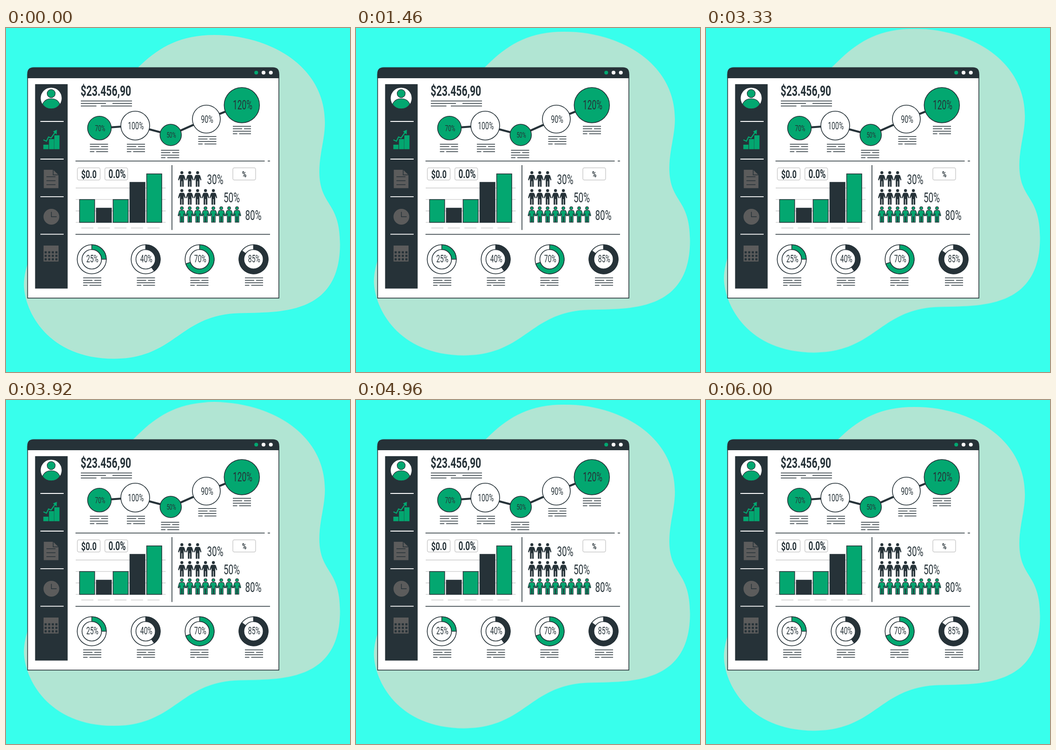
Recreate the animation shown at these times as an HTML page. Size 740 by 740 pixels, loop 6.04 s.

```html
<!DOCTYPE html>
<html lang="en">
<head>
<meta charset="utf-8">
<title>Dashboard</title>
<style>
  html, body { margin: 0; width: 100%; height: 100%; overflow: hidden; background: #38ffec; }
  svg { display: block; width: 740px; height: 740px; }
  text { font-family: Roboto, "Liberation Sans", sans-serif; fill: #263238; }
  .bold { font-weight: 700; }
  .line { fill: none; stroke: #263238; stroke-width: 1.6; }
</style>
</head>
<body>
<svg id="stage" viewBox="0 0 740 740"></svg>
<script>
const DARK = '#263238', GREEN = '#03a770', GREY = '#5c5c5c', PALE = '#cbcbcb', WHITE = '#fff';
const LOOP = 6040, RISE = 15;

const rect = (x, y, w, h, fill, more = '') =>
  `<rect x="${x}" y="${y}" width="${w}" height="${h}" fill="${fill}" ${more}/>`;
const circle = (x, y, r, fill, more = '') =>
  `<circle cx="${x}" cy="${y}" r="${r}" fill="${fill}" ${more}/>`;
const path = (d, fill, more = '') => `<path d="${d}" fill="${fill}" ${more}/>`;
const line = (d, color = DARK, width = 1.6) =>
  path(d, 'none', `stroke="${color}" stroke-width="${width}"`);
const outline = (width = 1.6) => `stroke="${DARK}" stroke-width="${width}"`;

// One condensed cut per weight
function label(str, x, y, size, bold = false, anchor = 'middle') {
  const narrow = bold ? 0.685 : 0.64;
  return `<text class="${bold ? 'bold' : ''}" transform="translate(${x} ${y}) scale(${narrow} 1)"
    font-size="${size}" text-anchor="${anchor}">${str}</text>`;
}

function blob() {
  return path(`M38.5 553C40 610 90 711 232 711.5C365 711 372 618 500 613.5
    C575 610 718.5 625 718.5 465C718.5 372 675 384 674 310C674 270 686 240 686 203
    C686 80 565 15 448 15C370 15 325 45 284 85L200 167L62 470C45 505 38.5 530 38.5 553Z`,
    '#b1e5d3', 'id="blob"');
}

function frame() {
  return rect(46.5, 100, 540.5, 481, WHITE, outline())
    + path('M45.7 108V98.500Q45.7 84.500 59.700 84.500H573.800Q587.800 84.500 587.800 98.500V108Z', DARK)
    + circle(538.3, 96, 4.1, GREEN) + circle(554, 96, 4.1, WHITE) + circle(569.7, 96, 4.1, WHITE);
}

function avatar() {
  return circle(97.2, 151, 22.6, WHITE)
    + path('M78.500 164C82 156 89 152 97.200 152S112.500 156 115.900 164A22.600 22.600 0 0 1 78.500 164Z', GREEN, outline(1.2))
    + circle(97.2, 141, 8.7, GREEN, outline(1.2));
}

function sidebar() {
  let s = rect(62.6, 120.8, 70, 439.7, DARK) + avatar();
  for (const y of [201, 282, 362.8, 443.6]) s += line(`M74 ${y}H124`, WHITE, 1.8);

  s += rect(80.3, 251, 11, 9.7, GREEN) + rect(92.5, 239, 11, 21.7, GREEN) + rect(104, 230.8, 11, 29.9, GREEN);
  s += line('M80.500 240.500L87 243.500L91.500 234.500L97 236.500L106 224', GREEN, 2.3);
  s += path('M109.500 219L101 222.500L109 229Z', GREEN);

  s += path('M81.300 305H101.500L112.800 316V344.500H81.300Z', GREY);
  s += line('M101.500 305V316H112.800M87 320H106.500M87 328.500H106.500M87 337H106.500', DARK, 1.5);

  s += circle(97.6, 406, 17, GREY) + line('M97.600 395.500V406H109', DARK, 1.5);

  s += rect(80.8, 468, 32.2, 34.3, GREY);
  for (let i = 0; i < 12; i++) s += rect(83 + i % 4 * 7.7, 480.3 + Math.floor(i / 4) * 7.5, 4.6, 4.6, DARK);
  return s;
}

const caption = (x, y) => line(`M${x} ${y}h39
  M${x} ${y + 5.3}h20m4 0h15M${x} ${y + 10.6}h39M${x} ${y + 16}h9.500m4 0h25.500`, DARK, 1.5);

function chain() {
  const nodes = [
    { x: 201, y: 215.3, r: 25.5, text: '70%', size: 18.5, tx: 202.5, ty: 222, cap: [180.5, 250] },
    { x: 278, y: 210, r: 31, text: '100%', size: 22, tx: 279.2, ty: 217.5, cap: [260, 250] },
    { x: 354.3, y: 230, r: 23, text: '50%', size: 17, tx: 355.5, ty: 236.2, cap: [333.5, 263] },
    { x: 431, y: 196, r: 30, text: '90%', size: 22.5, tx: 432.5, ty: 204, cap: [413.5, 233.5] },
    { x: 507.3, y: 166, r: 38, text: '120%', size: 27, tx: 509, ty: 175.3, cap: [488, 211.5] },
  ];
  let s = line('M' + nodes.map(n => `${n.x} ${n.y}`).join('L'), DARK, 4.2);
  nodes.forEach((n, i) => {
    s += circle(n.x, n.y, n.r, i % 2 ? WHITE : GREEN, outline());
    s += label(n.text, n.tx, n.ty, n.size) + caption(...n.cap);
  });
  return s;
}

function heading() {
  return label('$23.456,90', 160.5, 146.2, 31, true, 'start')
    + line('M161 157H271M161 162.300H215M229 162.300H271M161 167.700H194.500M204 167.700H271', DARK, 1.5);
}

const badge = x => rect(x, 300.7, 49, 26.2, WHITE, `rx="3.5" stroke="${PALE}" stroke-width="1.5"`);

function barChart() {
  let s = '';
  for (let i = 0; i < 4; i++) s += line(`M150 ${344.3 + i * 24.6}H343.500`, PALE, 1.4);
  [369, 387.5, 369, 332, 313.8].forEach((top, i) => {
    const x = 158.2 + i * 36.1;
    s += rect(x, top, 32.5, 418.2 - top, i % 2 ? DARK : GREEN, outline(1.5));
    s += line(`M${162 + i * 35.6} 430.300h26`, PALE, 1.4);
  });
  return s + badge(153.5) + badge(212.7)
    + label('$0.0', 178.3, 323, 24, true) + label('0.0%', 239, 323, 25, true);
}

function person(x, y, green) {
  const look = green ? outline(1.3) : '';
  const fill = green ? GREEN : DARK;
  return `<g transform="translate(${x} ${y})">`
    + path(`M-3 8H3Q5 8 5.600 10L8.200 18.800L6.400 20L4 14.500V33.500H.6V21.500H-.6V33.500H-4V14.500
        L-6.400 20L-8.200 18.800L-5.600 10Q-5 8 -3 8Z`, fill, look)
    + circle(0, 3.3, 3.2, fill, look) + '</g>';
}

function people() {
  let s = '';
  const rows = [[3, 308, '30%', 450], [5, 346.5, '50%', 485.5], [8, 384.3, '80%', 532]];
  rows.forEach(([count, y, text, tx], row) => {
    for (let i = 0; i < count; i++) s += person(378.3 + i * 16.95, y, row === 2);
    s += label(text, tx, y + 28.2, 29.5);
  });
  return s + badge(488) + label('%', 512.5, 321, 19, true);
}

// Ring segment running clockwise from the top
function segment(cx, cy, outer, inner, part) {
  const a = part * 2 * Math.PI, sin = Math.sin(a), cos = Math.cos(a), big = part > .5 ? 1 : 0;
  return `M${cx} ${cy - outer}A${outer} ${outer} 0 ${big} 1 ${cx + outer * sin} ${cy - outer * cos}
    L${cx + inner * sin} ${cy - inner * cos}A${inner} ${inner} 0 ${big} 0 ${cx} ${cy - inner}Z`;
}

function rings() {
  const captions = [166, 281.5, 396.5, 514];
  return [25, 40, 70, 85].map((value, i) => {
    const x = 184.5 + i * 116, y = 497.5;
    return circle(x, y, 31.3, WHITE, outline()) + circle(x, y, 21, WHITE, outline())
      + path(segment(x, y, 31.3, 21, value / 100), i % 2 ? DARK : GREEN, outline())
      + label(value + '%', x + 1.3, y + 6.6, 22) + caption(captions[i], 537.5);
  }).join('');
}

const dividers = line('M149.500 286.300H556.500M563 286.300H568M149.500 443.800H568M357 295V434.500');

document.getElementById('stage').innerHTML =
  blob() + frame() + sidebar() + heading() + chain() + dividers + barChart() + people() + rings();

document.getElementById('blob').animate(
  [{ transform: 'translateY(0px)' }, { transform: `translateY(${-RISE}px)` }],
  { duration: LOOP / 2, direction: 'alternate', iterations: Infinity, easing: 'linear' });
</script>
</body>
</html>
```
